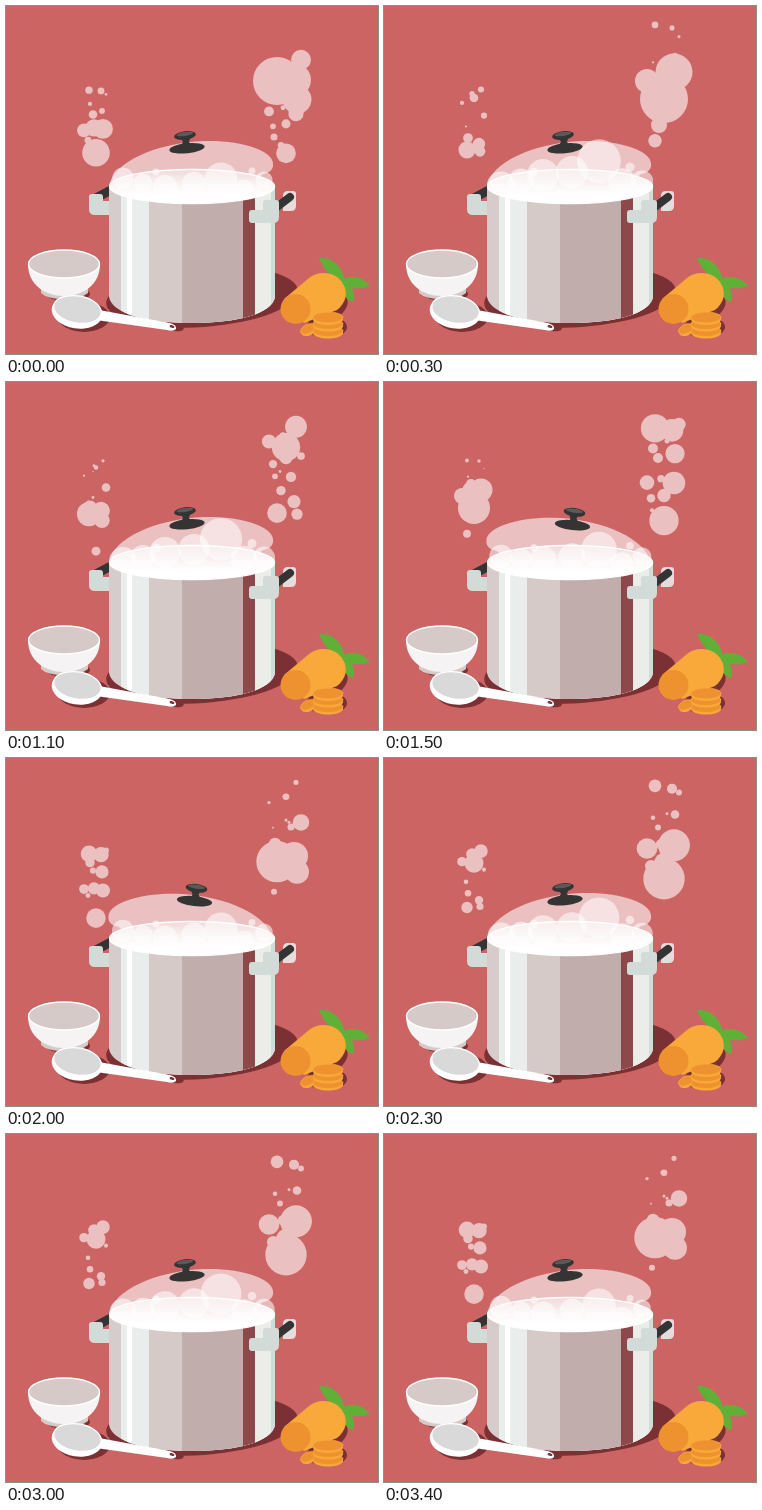
Write an HTML page that moves like this. It is 372 px wide and 348 px high and loops after 3.5 s.

```html
<!DOCTYPE html>
<html lang="en">
<head>
<meta charset="utf-8">
<title>Boiling pot</title>
<style>
  html, body { margin: 0; width: 100%; height: 100%; overflow: hidden; background: #cd6464; }
  svg { display: block; width: 372px; height: 348px; }
</style>
</head>
<body>
<svg viewBox="0 0 372 348">
  <defs>
    <clipPath id="body"><path d="M103 180V291C106 308 142 317 186 317S266 308 269 291V180Z"/></clipPath>
    <clipPath id="mouth"><path d="M103 120H269V180A83 18 0 0 1 103 180Z"/></clipPath>
    <linearGradient id="inside" x1="0" y1="0" x2="0" y2="1">
      <stop offset="0" stop-color="#f1d9d9"/>
      <stop offset=".5" stop-color="#fcf6f6"/>
      <stop offset=".75" stop-color="#fff"/>
    </linearGradient>
  </defs>
  <rect width="372" height="348" fill="#cd6464"/>

  <g fill="#7b3034">
    <ellipse cx="196" cy="291" rx="96" ry="30" transform="rotate(-4 196 291)"/>
    <ellipse cx="78" cy="311" rx="26" ry="15"/>
    <ellipse cx="62" cy="288" rx="22" ry="7"/>
    <ellipse cx="320" cy="302" rx="23" ry="14" transform="rotate(-25 320 302)"/>
    <ellipse cx="321" cy="321" rx="20" ry="11"/>
    <ellipse cx="168" cy="321" rx="10" ry="4" transform="rotate(10 168 321)"/>
  </g>

  <g id="steam" fill="#ebc0c0"></g>

  <g id="lid">
    <path fill="#ebc0c0" d="M103 180C107 157 148 137 198 135C237 134 266 145 267 157C268 164 263 167 257 168L240 182Z"/>
    <g fill="#343434">
      <path d="M174 130L185 129L183 136L187 141H174L177 136Z"/>
      <ellipse cx="181" cy="142.3" rx="17.7" ry="5" transform="rotate(-6 181 142.3)"/>
      <ellipse cx="179" cy="129.5" rx="11" ry="4.3" transform="rotate(-8 179 129.5)"/>
    </g>
    <ellipse cx="179" cy="128" rx="8.5" ry="2" fill="#5c5959" transform="rotate(-8 179 128)"/>
  </g>

  <path d="M90 192L105 184" stroke="#343434" stroke-width="9"/>
  <g clip-path="url(#body)">
    <rect x="103" y="178" width="167" height="142" fill="#d6cccb"/>
    <rect x="115" y="178" width="155" height="142" fill="#e9eeed"/>
    <rect x="121" y="178" width="5" height="142" fill="#fff"/>
    <rect x="143" y="178" width="33" height="142" fill="#d5cac8"/>
    <rect x="176" y="178" width="61" height="142" fill="#c1aeac"/>
    <rect x="237" y="178" width="12" height="142" fill="#8d4949"/>
    <rect x="249" y="178" width="16" height="142" fill="#ebede8"/>
    <rect x="265" y="178" width="5" height="142" fill="#d3dbd8"/>
  </g>
  <ellipse cx="186" cy="180.5" rx="82.5" ry="17" fill="url(#inside)" stroke="#fff" stroke-width="1.3"/>
  <g id="foam" clip-path="url(#mouth)" fill="#fff" fill-opacity=".55"></g>

  <g fill="#d3dbd8">
    <path d="M83 191q0-3 3-3h8q3 0 3 3v4h6v14h-14q-6 0-6-6Z"/>
    <path fill="#e4dddc" d="M277 190q0-5 5-5h5q3 0 3 3v12q0 5-5 5h-8Z"/>
    <path d="M267 204L284 191" stroke="#343434" stroke-width="8" stroke-linecap="round"/>
    <path d="M257 197q0-3 3-3h10q3 0 3 3v14q0 6-6 6h-21q-3 0-3-3v-7q0-3 3-3h11Z"/>
  </g>

  <path fill="#d6cac8" d="M35 278H82V287Q75 293 58 293T35 287Z"/>
  <path fill="#f5f3f3" d="M22 258C22 278 38 290 58 290S94 278 94 258Z"/>
  <ellipse cx="58" cy="258" rx="35.5" ry="14" fill="#d6cac8" stroke="#fff" stroke-width="1.5"/>

  <g fill="#fff">
    <path d="M93 304L164 317Q171 319 170 323Q168 326 161 324L90 314Z"/>
    <ellipse cx="71" cy="306" rx="25.5" ry="16.5" transform="rotate(9 71 306)"/>
  </g>
  <ellipse cx="71.5" cy="303.5" rx="24" ry="13.5" fill="#d8d9d8" stroke="#fff" stroke-width="1.2" transform="rotate(10 71.5 303.5)"/>
  <ellipse cx="166" cy="320.5" rx="2.6" ry="1.3" fill="#7b3034" transform="rotate(18 166 320.5)"/>

  <g fill="#60af36">
    <path d="M339 275C332 275 320 269 313 252C326 251 336 259 339 275Z"/>
    <path d="M334 276C341 268 355 269 364 280C353 284 342 283 334 276Z"/>
    <path d="M335 271C345 276 350 286 347 296C339 294 334 285 335 271Z"/>
  </g>
  <path fill="#f9a93a" d="M278 293L303 272C313 264 329 266 336 276C343 286 340 297 331 304L298 317Z"/>
  <circle cx="289.5" cy="303" r="15" fill="#ee922f"/>
  <g id="slices"></g>
</svg>
<script>
const $ = id => document.getElementById(id);
const circle = (x, y, r) => `<circle cx="${x}" cy="${y}" r="${r}"/>`;

const slice = (x, y, rx, ry, turn) => `<g transform="translate(${x} ${y}) rotate(${turn})">
  <ellipse cy="2" rx="${rx}" ry="${ry}" fill="#f9a93a"/>
  <ellipse rx="${rx}" ry="${ry}" fill="#ee922f" stroke="#f9a93a" stroke-width=".8"/></g>`;
$('slices').innerHTML = slice(302, 323, 8, 4.5, -25)
  + [325, 318, 311.5].map(y => slice(322, y, 15, 5.5, 0)).join('');

// puffs by the step at which they are largest: x, y, radius and, if unusual, rise
const puffs = {
  3: [[280, 93, 24, 60], [290, 66, 18.5, 46], [263, 75, 12], [280, 90, 11],
      [267, 95, 7, 28], [275, 119, 8], [277, 70, 6, 35]],
  5: [[83, 114, 14], [100, 99, 5], [84, 115, 8], [285, 82, 6, 28]],
  5.2: [[95, 110, 11, 35], [96, 124, 9.5]],
  7: [[271, 75, 24, 62], [268, 131, 3.5, 6]],
  7.15: [[288, 70, 17, 54], [295, 52, 10, 24], [291, 90, 14.5, 46], [269, 75, 7.5]],
  8: [[88, 109, 10], [90, 126, 16], [78, 114, 8], [97, 108, 11.5],
      [82, 129, 4], [87, 102, 5], [274, 76, 5], [283, 59, 2.5]]
};

// a puff swells slowly, shrinks fast and rises quickest at its peak
function puffAt([x, y, r, rise = r * 2.8], d) {
  if (d < -4.1 || d > 3.4) return '';
  const width = d < 0 ? 2.5 : 1.2;
  return circle(x, y - rise * Math.tanh(d / 2), r / (1 + (d / width) ** 2));
}

// foam bubbles: x, y, radius, lift
const bubbles = [
  [117, 176, 12.5, -4], [215, 164, 19, 9], [150, 166, 4, 0], [188, 172, 14, 6],
  [159, 175, 14, 6], [137, 176, 11, 1], [246, 163, 4, 2], [238, 180, 12, 4], [258, 175, 10, -1]
];

const LOOP = 3500, STEP = 100, CYCLE = 7;
let shown = -1;

function draw(now) {
  const tick = Math.floor(now % LOOP / STEP);
  if (tick === shown) return;
  shown = tick;
  const step = tick % CYCLE;
  $('steam').innerHTML = Object.entries(puffs).map(([peak, group]) =>
    group.map(p => puffAt(p, step - peak) + puffAt(p, step + CYCLE - peak)).join('')).join('');
  const swell = Math.cos((step - 3.2) / CYCLE * 2 * Math.PI);
  $('foam').innerHTML = bubbles.map(([x, y, r, lift]) =>
    circle(x, y - lift * swell, r * (1 + .15 * swell))).join('');
  const tipped = tick >= 13 && tick < 22;
  $('lid').setAttribute('transform', tipped ? 'translate(369.5 .8) scale(-1 1)' : '');
}

const start = performance.now();
function loop() {
  draw(performance.now() - start);
  requestAnimationFrame(loop);
}
loop();
</script>
</body>
</html>
```
